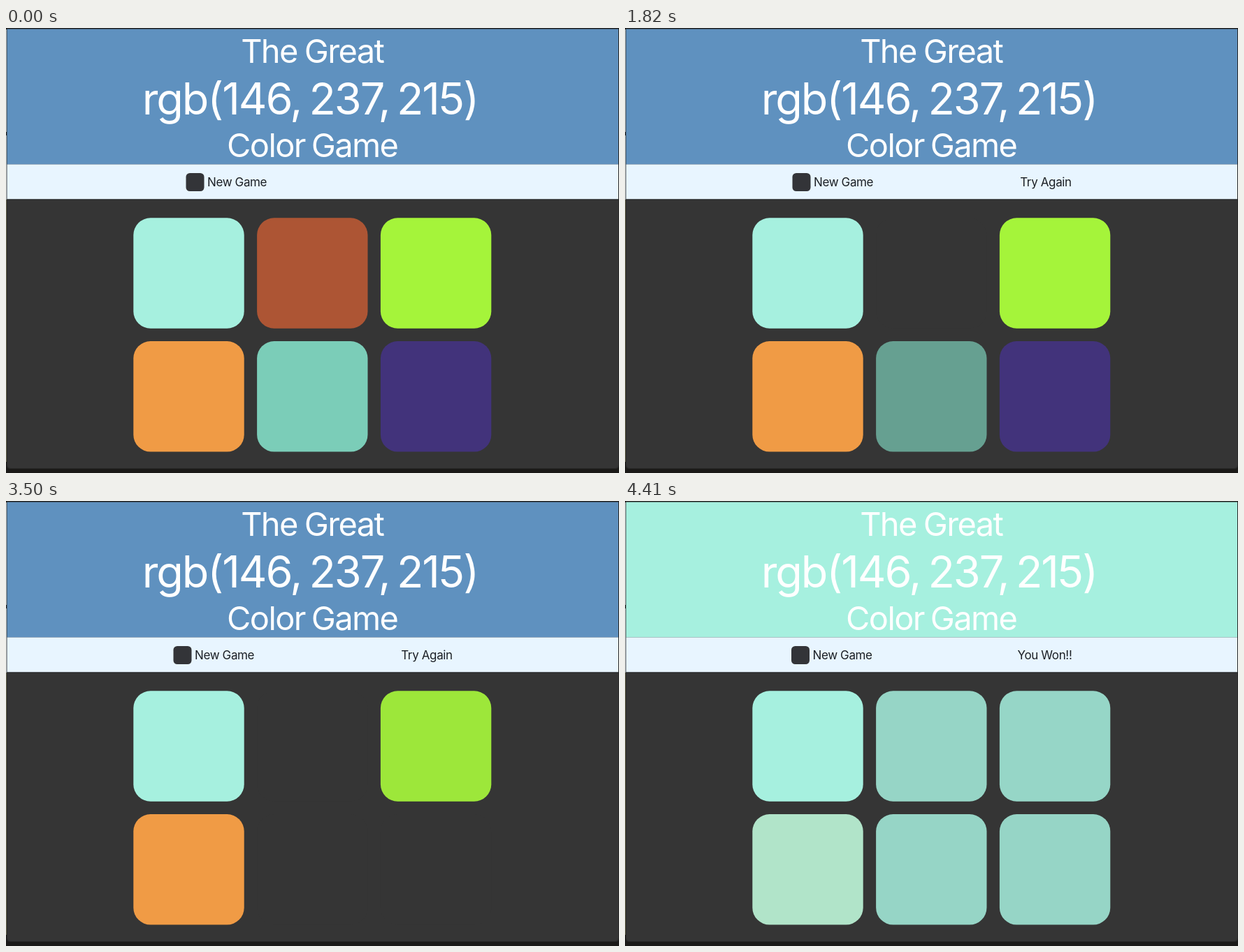
Write an HTML page that moves like this. It is 877 px wide and 638 px high and loops after 4.48 s.

```html
<!DOCTYPE html>
<html lang="en">
<head>
<meta charset="utf-8">
<title>Color Game</title>
<style>
  html, body { margin: 0; width: 100%; height: 100%; overflow: hidden; background: #1b1a18; }
  svg { display: block; width: 877px; height: 638px; }
  text { font-family: Inter, "Open Sans", sans-serif; font-optical-sizing: none; }
  .title { fill: #fff; font-weight: 400; text-anchor: middle; }
  .small { font-size: 47px; letter-spacing: -.034em; }
  .big { font-size: 63px; letter-spacing: -.033em; }
  .nav { fill: #1c2025; font-size: 17px; letter-spacing: -.022em; }
  #message { text-anchor: middle; }
</style>
</head>
<body>
<svg viewBox="0 0 877 638">
  <!-- desktop edge and window frame -->
  <rect width="877" height="638" fill="#1b1a18"/>
  <rect y="2" width="1" height="244" fill="#a3a8aa"/>
  <rect y="149" width="1" height="5" fill="#222"/>
  <rect y="246" width="1" height="376" fill="#68664f"/>
  <path d="M1 1H877V627q0 5-5 5H6q-5 0-5-5Z" fill="#292929"/>
  <path d="M2 2H876V626q0 5-5 5H7q-5 0-5-5Z" fill="#353535"/>

  <rect id="header" x="1.5" y="1.5" width="874.5" height="194"/>
  <g class="title small">
    <text x="376.5" y="50">The</text>
    <text x="483.5" y="50">Great</text>
    <text x="372" y="185">Color</text>
    <text x="498.5" y="185">Game</text>
  </g>
  <g class="title big">
    <text x="308.5" y="124">rgb(146,</text>
    <text x="491" y="124">237,</text>
    <text x="617" y="124">215)</text>
  </g>

  <rect x="1.5" y="195.5" width="874.5" height="50" fill="#e8f5ff"/>
  <rect x="1.5" y="245.5" width="874.5" height="1" fill="#242628"/>
  <g id="newGame">
    <rect y="208" width="26" height="26" rx="5.5" fill="#333438"/>
    <text class="nav" x="30.5" y="227">New Game</text>
  </g>
  <text class="nav" id="message" y="227"></text>
  <g id="tiles"></g>
</svg>
<script>
  const LOOP = 4480, STEP = 70, FADE = 750, WIN = 3990;
  const SIZE = 158.4, PITCH = 176.8;
  const BACK = [53, 53, 53], GOAL = [166, 240, 223];
  // Each tile: colour and the moment it is picked wrongly, if ever.
  const tiles = [
    { color: GOAL },
    { color: [173, 85, 52], click: 350 },
    { color: [165, 244, 58], click: 3438 },
    { color: [240, 155, 69] },
    { color: [123, 205, 184], click: 1670 },
    { color: [66, 51, 123], click: 2328 }
  ];
  const FIRST_CLICK = tiles[1].click;
  const byId = id => document.getElementById(id);
  const header = byId('header'), newGame = byId('newGame'), message = byId('message');

  tiles.forEach((tile, i) => {
    const rect = document.createElementNS('http://www.w3.org/2000/svg', 'rect');
    const attrs = {
      x: 182.3 + i % 3 * PITCH, y: 272.3 + Math.floor(i / 3) * PITCH,
      width: SIZE, height: SIZE, rx: 24.5
    };
    for (const name in attrs) rect.setAttribute(name, attrs[name]);
    tile.rect = byId('tiles').appendChild(rect);
  });

  // The CSS "ease" curve, cubic-bezier(.25, .1, .25, 1).
  function ease(x) {
    if (x <= 0) return 0;
    if (x >= 1) return 1;
    const bezier = (a, b, s) => 3 * a * s * (1 - s) ** 2 + 3 * b * s * s * (1 - s) + s ** 3;
    let low = 0, high = 1;
    for (let i = 0; i < 24; i++) {
      const mid = (low + high) / 2;
      if (bezier(.25, .25, mid) < x) low = mid; else high = mid;
    }
    return bezier(.1, 1, low);
  }

  const mix = (a, b, k) => a.map((v, i) => v + (b[i] - v) * k);
  const css = c => `rgb(${c.map(Math.round).join(',')})`;

  function tileColor({ color, click = Infinity }, t) {
    const faded = mix(color, BACK, ease((Math.min(t, WIN) - click) / FADE));
    return mix(faded, GOAL, ease((t - WIN) / FADE));
  }

  function draw(t) {
    const won = t >= WIN, tried = t >= FIRST_CLICK;
    header.setAttribute('fill', won ? css(GOAL) : '#5f91bf');
    newGame.setAttribute('transform', `translate(${won ? 238 : tried ? 239.5 : 257.5})`);
    message.textContent = won ? 'You Won!!' : tried ? 'Try Again' : '';
    message.setAttribute('x', won ? 600.5 : 602);
    for (const tile of tiles) tile.rect.setAttribute('fill', css(tileColor(tile, t)));
  }

  const start = performance.now();
  function tick() {
    const t = (performance.now() - start) % LOOP;
    draw(Math.floor(t / STEP) * STEP);
    requestAnimationFrame(tick);
  }
  tick();
</script>
</body>
</html>
```
